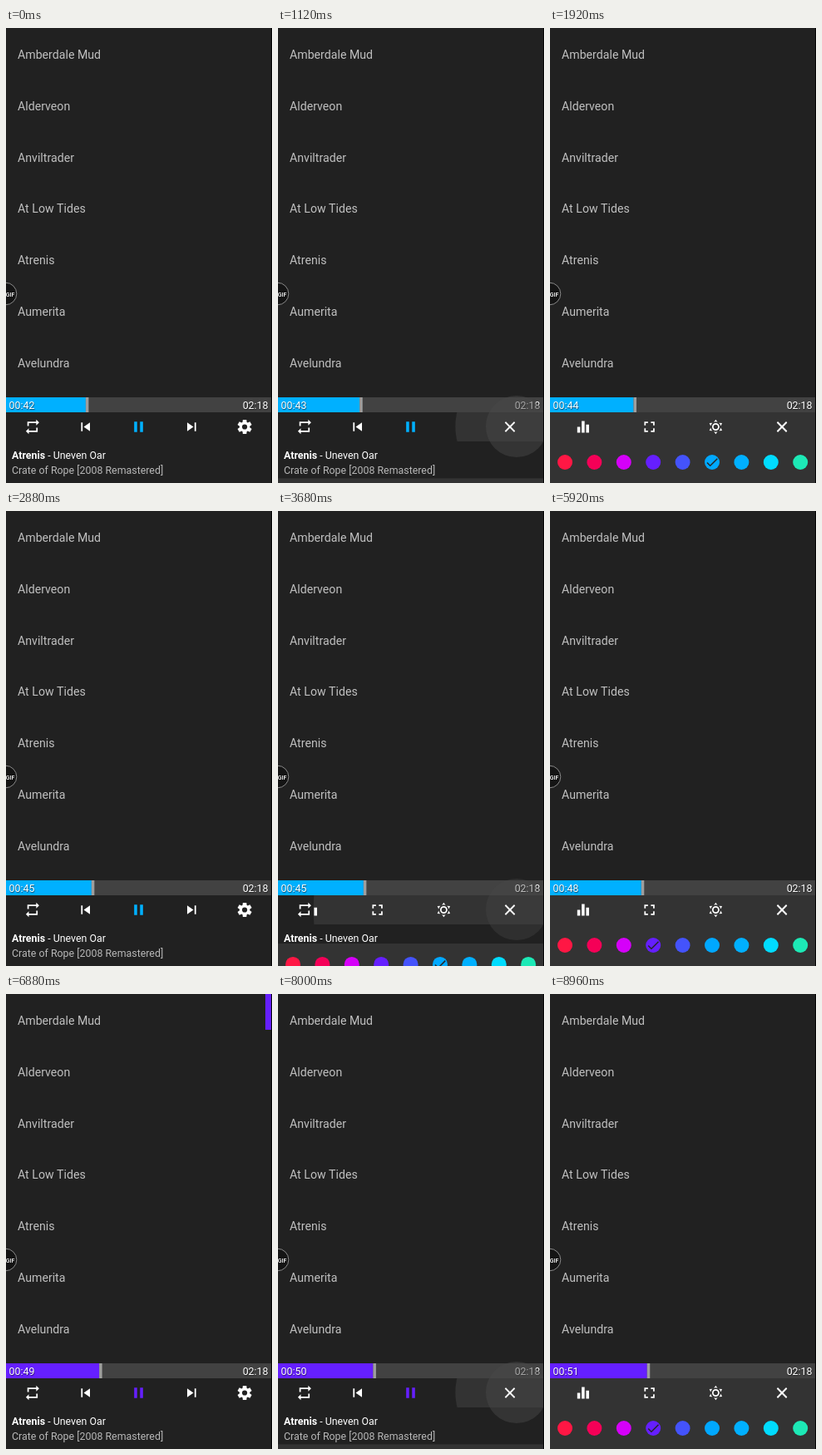
Animation of 320 by 547 pixels, one loop 9600 ms. Source, as an HTML page with a canvas:

```html
<!DOCTYPE html>
<html lang="en">
<head>
<meta charset="utf-8">
<title>Music player</title>
<style>
  html, body { margin: 0; width: 100%; height: 100%; overflow: hidden; background: #212121; }
  canvas { display: block; width: 320px; height: 547px; }
</style>
</head>
<body>
<canvas id="stage"></canvas>
<script>
const LOOP = 9600, STEP = 160, TOTAL = 138;
const WIDTH = 319, DP = WIDTH / 360;
const BLUE = '#00b0ff', VIOLET = '#651fff', PANEL = '#333';
const FONT = 'Roboto, sans-serif';

const artists = ['Amberdale Mud', 'Alderveon', 'Anviltrader', 'At Low Tides', 'Atrenis', 'Aumerita', 'Avelundra'];
const swatches = ['#ff1744', '#f50057', '#d500f9', VIOLET, '#4453fc', '#00a8ff', BLUE, '#00dcff', '#1de9b6'];

// Icons on a 24 x 24 grid
const icons = {
  repeat: 'M7 7h10v3l4-4-4-4v3H5v6h2zM17 17H7v-3l-4 4 4 4v-3h12v-6h-2z',
  prev: 'M6 6h2v12H6zM9.5 12l8.5 6V6z',
  pause: 'M6 19h4V5H6zM14 5v14h4V5z',
  next: 'M6 18l8.5-6L6 6zM16 6v12h2V6z',
  bars: 'M10 20h4V4h-4zM4 20h4v-8H4zM16 9v11h4V9z',
  full: 'M7 14H5v5h5v-2H7zM5 10h2V7h3V5H5zM17 17h-3v2h5v-5h-2zM14 5v2h3v3h2V5z',
  close: 'M19 6.41L17.59 5 12 10.59 6.41 5 5 6.41 10.59 12 5 17.59 6.41 19 12 13.41 17.59 19 19 17.59 13.41 12z',
  check: 'M9 16.17L4.83 12l-1.42 1.41L9 19 21 7l-1.41-1.41z'
};
for (const name in icons) icons[name] = new Path2D(icons[name]);
icons.gear = sixfold((path, a) => {
  for (const [r, d] of [[7, -.42], [10, -.25], [10, .25], [7, .42]])
    path.lineTo(12 + r * Math.cos(a + d), 12 + r * Math.sin(a + d));
}, 3.5);
icons.sun = sixfold((path, a) => {
  path.moveTo(12 + 10 * Math.cos(a), 12 + 10 * Math.sin(a));
  path.arc(12, 12, 7, a - .35, a + .35);
  path.closePath();
}, 5, 3);

function sixfold(part, ...rings) {
  const path = new Path2D();
  for (let k = 0; k < 6; k++) part(path, Math.PI / 6 + k * Math.PI / 3);
  path.closePath();
  for (const r of rings) {
    path.moveTo(12 + r, 12);
    path.arc(12, 12, r, 0, 7);
  }
  return path;
}

const canvas = document.getElementById('stage');
const ctx = canvas.getContext('2d');
const dpr = window.devicePixelRatio || 1;
canvas.width = 320 * dpr;
canvas.height = 547 * dpr;
ctx.scale(dpr, dpr);

const clamp = v => Math.min(1, Math.max(0, v));

function rect(x, y, w, h, color) {
  ctx.fillStyle = color;
  ctx.fillRect(x, y, w, h);
}
function disc(x, y, r, color) {
  ctx.fillStyle = color;
  ctx.beginPath();
  ctx.arc(x, y, r, 0, 7);
  ctx.fill();
}
function text(str, x, y, size, color = '#fff', weight = 400, align = 'left') {
  ctx.font = `${weight} ${size}px ${FONT}`;
  ctx.textAlign = align;
  ctx.fillStyle = color;
  ctx.fillText(str, x, y);
  return x + ctx.measureText(str).width;
}
function icon(name, x, y = 479.5, color = '#fff', scale = DP) {
  ctx.save();
  ctx.translate(x, y);
  ctx.scale(scale, scale);
  ctx.translate(-12, -12);
  ctx.fillStyle = color;
  ctx.fill(icons[name], 'evenodd');
  ctx.restore();
}
function iconRow(names, tint = {}) {
  names.forEach((name, i) => icon(name, (i + .5) * WIDTH / names.length, 479.5, tint[name]));
}
function clipped(shape, paint) {
  ctx.save();
  ctx.beginPath();
  shape();
  ctx.clip();
  paint();
  ctx.restore();
}

// Settings panel: taps that open and close it
const opens = [986, 3386, 7866], shuts = [2426], RECREATE = 6240;

function openness(t) {
  if (t < 2400) return clamp((t - opens[0]) / 400);
  if (t < 3360) return 1 - clamp((t - shuts[0]) / 400);
  if (t < RECREATE) return clamp((t - opens[1]) / 400);
  return clamp((t - opens[2]) / 400);
}

function ripple(t, start, x) {
  const age = t - start + 60;
  if (age <= 0 || age >= 500) return;
  const alpha = .5 * (1 - clamp((age - 300) / 200));
  disc(x, 479, 37 * clamp(age / 190), `rgba(72,72,72,${alpha})`);
}

function drawList(t, accent) {
  rect(0, 0, 320, 547, '#212121');
  artists.forEach((name, i) => text(name, 14, 37 + i * 61.83, 16 * DP, '#c0c0c0'));

  const bar = clamp((t - 6080) / 320) * (1 - clamp((t - 7360) / 320));
  if (t >= RECREATE && bar > 0) {
    ctx.globalAlpha = bar;
    rect(312, 0, 7, 43, accent);
    ctx.globalAlpha = 1;
  }

  disc(-.5, 319.5, 13.3, '#141414');
  ctx.strokeStyle = '#8a8a8a';
  ctx.lineWidth = 1;
  ctx.stroke();
  text('GIF', 5, 322.5, 7, '#fff', 500, 'center');
}

function drawPlayer(accent) {
  iconRow(['repeat', 'prev', 'pause', 'next', 'gear'], { pause: accent });
  const end = text('Atrenis', 7, 518, 14 * DP, '#fff', 700);
  text(' - Uneven Oar', end, 518, 14 * DP);
  text('Crate of Rope [2008 Remastered]', 7, 536, 14 * DP, '#b8b8b8');
}

function drawPanel(t, p) {
  if (p <= 0) return;
  const radius = 292 * (1 - Math.cos(Math.PI * p)) / 2;
  clipped(() => ctx.rect(0, 462, 320, 35), () =>
    clipped(() => ctx.arc(287, 479, radius, 0, 7), () => {
      rect(0, 462, 320, 35, PANEL);
      iconRow(['bars', 'full', 'sun', 'close']);
    }));

  const top = 547 - 50 * p * p;
  rect(0, top, 320, 50, PANEL);
  const press = clamp((t - 4900) / 1020);
  if (press > 0 && press < 1)
    disc(124, top + 25, 25, `rgba(255,255,255,${.1 * Math.sin(Math.PI * press)})`);
  const chosen = t < 5440 ? 5 : 3;
  swatches.forEach((color, i) => {
    const x = 18 + i * 35.4;
    disc(x, top + 25, 9, color);
    if (i === chosen) icon('check', x, top + 25, '#262626', .76);
  });
}

function drawProgress(t, accent) {
  const secs = 42 + Math.floor((t + STEP) / 1000);
  const x = secs / TOTAL * 320 - 1.5;
  rect(0, 444, 320, 18, '#424242');
  rect(0, 444, x, 18, accent);
  rect(x, 444, 3.5, 18, '#9e9e9e');
  ctx.save();
  ctx.shadowColor = 'rgba(0,0,0,.6)';
  ctx.shadowBlur = dpr;
  ctx.shadowOffsetX = ctx.shadowOffsetY = dpr / 2;
  text('00:' + secs, 3.5, 458, 14 * DP);
  text('02:18', 315.5, 458, 14 * DP, '#fff', 400, 'right');
  ctx.restore();
}

function draw(t) {
  const accent = t < RECREATE ? BLUE : VIOLET;
  drawList(t, accent);
  drawProgress(t, accent);
  drawPlayer(accent);
  drawPanel(t, openness(t));
  opens.forEach(s => ripple(t, s, 287));
  shuts.forEach(s => ripple(t, s, 279));
  // The close icon stays bright above its ripple
  if (openness(t) > .1) icon('close', 279);
  rect(WIDTH, 0, 1, 547, '#000');
}

const begin = performance.now();
function tick() {
  const t = (performance.now() - begin) % LOOP;
  draw(Math.floor(t / STEP) * STEP);
  requestAnimationFrame(tick);
}
tick();
</script>
</body>
</html>
```
